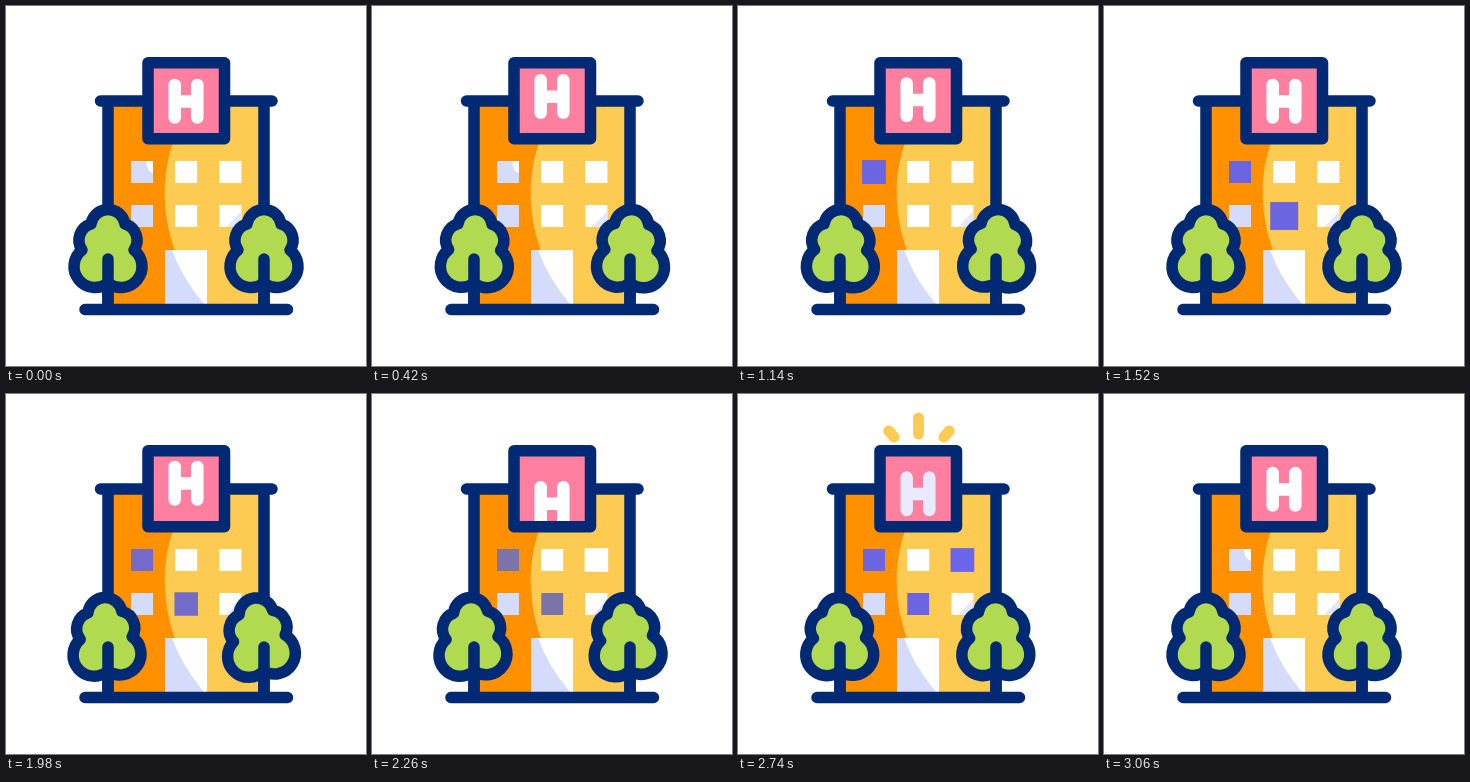
Recreate the animation shown at these times as an HTML page. Size 360x360 px, loop 3.08 s.

```html
<!DOCTYPE html>
<html lang="en">
<head>
<meta charset="utf-8">
<title>Hospital</title>
<style>
  html, body { margin: 0; width: 100%; height: 100%; overflow: hidden; background: #fff; }
  svg { display: block; width: 100vw; height: 100vh; }
  .line { fill: none; stroke: #022a74; stroke-width: 11.5; stroke-linecap: round; stroke-linejoin: round; }
</style>
</head>
<body>
<svg viewBox="0 0 360 360">
  <defs>
    <clipPath id="panel"><rect x="147.5" y="62" width="70" height="65.5"/></clipPath>
    <clipPath id="wall"><rect x="102" y="95" width="156" height="208"/></clipPath>
    <clipPath id="door"><rect x="159" y="244" width="42" height="54"/></clipPath>
    <path id="crown" d="M102 277A21 21 0 0 1 76 244A17 17 0 0 1 85 218A17.2 17.2 0 0 1 119 218A17 17 0 0 1 128 244A21 21 0 0 1 102 277Z"/>
  </defs>

  <rect x="102" y="95" width="156" height="208" fill="#fdca52"/>
  <path id="shade" clip-path="url(#wall)" fill="#ff9100" d="M102 95H190C150 145 144 225 198 298V303H102Z"/>
  <g id="windows"></g>
  <rect x="159" y="244" width="42" height="54" fill="#fff"/>
  <path clip-path="url(#door)" fill="#d5dcfb" d="M159 244H166Q176 272 198 298H159Z"/>

  <path class="line" d="M102 95V303M258 95V303M94.500 95H266M79 303.500H281.500"/>

  <g id="rays" fill="none" stroke="#fdca52" stroke-width="11" stroke-linecap="round"></g>

  <rect x="142" y="56.800" width="76.500" height="76" fill="#fe7fa0"/>
  <g clip-path="url(#panel)">
    <path id="letter" d="M168.700 79V111.500M191.300 79V111.500M168.700 95.500H191.300" fill="none" stroke="#fff" stroke-width="12.500" stroke-linecap="round"/>
  </g>
  <rect class="line" x="142" y="56.800" width="76.500" height="76"/>

  <g id="left"><use href="#crown" class="line" style="fill:#b2da51"/></g>
  <path class="line" d="M102 253V303"/>
  <g transform="translate(156 0)">
    <g id="right"><use href="#crown" class="line" style="fill:#b2da51"/></g>
    <path class="line" d="M102 253V303"/>
  </g>
</svg>
<script>
const LOOP = 3080, HOLD = 100, LEAD = 80, PASS = 1500;
const NS = 'http://www.w3.org/2000/svg';
const $ = id => document.getElementById(id);

function add(parent, tag, attrs) {
  const el = document.createElementNS(NS, tag);
  for (const k in attrs) el.setAttribute(k, attrs[k]);
  return parent.appendChild(el);
}

// Eased value at time t along [time, value] steps
function track(steps, t) {
  if (t <= steps[0][0]) return steps[0][1];
  for (let i = 1; i < steps.length; i++) {
    const [t0, a] = steps[i - 1], [t1, b] = steps[i];
    if (t <= t1) {
      const u = (t - t0) / (t1 - t0);
      return a + (b - a) * u * u * (3 - 2 * u);
    }
  }
  return steps[steps.length - 1][1];
}

const mix = (a, b, u) => `rgb(${a.map((v, i) => Math.round(v + (b[i] - v) * u))})`;

const sway = {
  left: [[0, 0], [700, 2], [1440, 0], [2050, -3.4], [2660, -0.8], [2980, 0]],
  right: [[0, 0], [740, 3.4], [1440, 0], [1880, -7.5], [2180, -5.5], [2660, -0.5], [2980, 0]]
};

// Window lamps: column, row, moment of the pop
const lamps = [[0, 0, 680], [1, 1, 1430], [2, 0, 2260]].map(([col, row, at]) => ({ col, row, at }));
const dim = [[1500, 0], [1900, 0.45], [2180, 1], [2600, 0]];
const off = [[2800, 1], [2960, 0]];

for (let row = 0; row < 2; row++) {
  for (let col = 0; col < 3; col++) {
    const x = 125 + col * 44.2, y = 155 + row * 44;
    const base = col ? '#fff' : '#d5dcfb';
    add($('windows'), 'rect', { x, y, width: 22, height: 22, fill: base });
    if (!col && !row) add($('windows'), 'path', { d: `M${x + 15} ${y}H${x + 22}V${y + 12}Q${x + 16} ${y + 11} ${x + 15} ${y}Z`, fill: '#fff' });
    if (col === 2 && row) add($('windows'), 'path', { d: `M${x + 22} ${y + 6}V${y + 22}H${x + 7}Z`, fill: '#e3e7fc' });
  }
}
for (const lamp of lamps) lamp.el = add($('windows'), 'rect', {});

const rays = [[180.5, 40, 0, -1], [156, 43, -0.65, -0.76], [206, 43, 0.65, -0.76]].map(
  ([x, y, dx, dy], i) => ({ x, y, dx, dy, len: i ? 8 : 16, el: add($('rays'), 'path', {}) }));
const rayGrow = [[2440, 0], [2660, 1], [2760, 1.2], [2900, 0]];
const raySlide = [[2440, -8], [2660, 0], [2760, 1.5], [2900, 4]];
const tint = [[2350, 0], [2620, 1], [2700, 1], [2900, 0]];

// The letter drops out of the panel and comes back from above
function letterY(t) {
  const p = t % PASS;
  if (p < 430) return track([[200, 0], [400, -6]], p);
  if (p < 860) return -6 + 70 * ((p - 430) / 467) ** 2;
  return track([[860, -60], [1110, 5], [1400, 0]], p);
}

function draw(t) {
  for (const side in sway) $(side).setAttribute('transform', `rotate(${track(sway[side], t)} 102 280)`);

  const letter = $('letter');
  letter.setAttribute('transform', `translate(0 ${letterY(t)})`);
  letter.setAttribute('stroke', mix([255, 255, 255], [232, 233, 251], track(tint, t)));

  const color = mix([107, 101, 226], [122, 116, 168], track(dim, t));
  for (const { col, row, at, el } of lamps) {
    const size = 22 * track([[at - 120, 1], [at, 1.27], [at + 460, 1.07], [at + 600, 1]], t);
    const x = 136 + col * 44.2 - size / 2, y = 166 + row * 44 - size / 2;
    const lit = col === 2 ? track([[at - 70, 0], [at + 80, 1]], t) : track([[at - 120, 0], [at - 30, 1]], t);
    el.setAttribute('x', x);
    el.setAttribute('y', y);
    el.setAttribute('width', size);
    el.setAttribute('height', size);
    el.setAttribute('fill', col === 2 ? mix([255, 255, 255], [107, 101, 236], lit) : color);
    const shown = col === 2 ? (t > at - 120 ? 1 : 0) : lit;
    el.setAttribute('opacity', shown * track(off, t));
  }

  const grow = track(rayGrow, t), slide = track(raySlide, t);
  for (const { x, y, dx, dy, len, el } of rays) {
    const far = slide + len * grow;
    el.setAttribute('d', `M${x + dx * slide} ${y + dy * slide}L${x + dx * far} ${y + dy * far}`);
  }
  $('rays').setAttribute('opacity', Math.min(1, grow * 3));
}

function tick() {
  const t = performance.now() % LOOP;
  draw(t < HOLD ? 0 : t - LEAD);
  requestAnimationFrame(tick);
}
tick();
</script>
</body>
</html>
```
